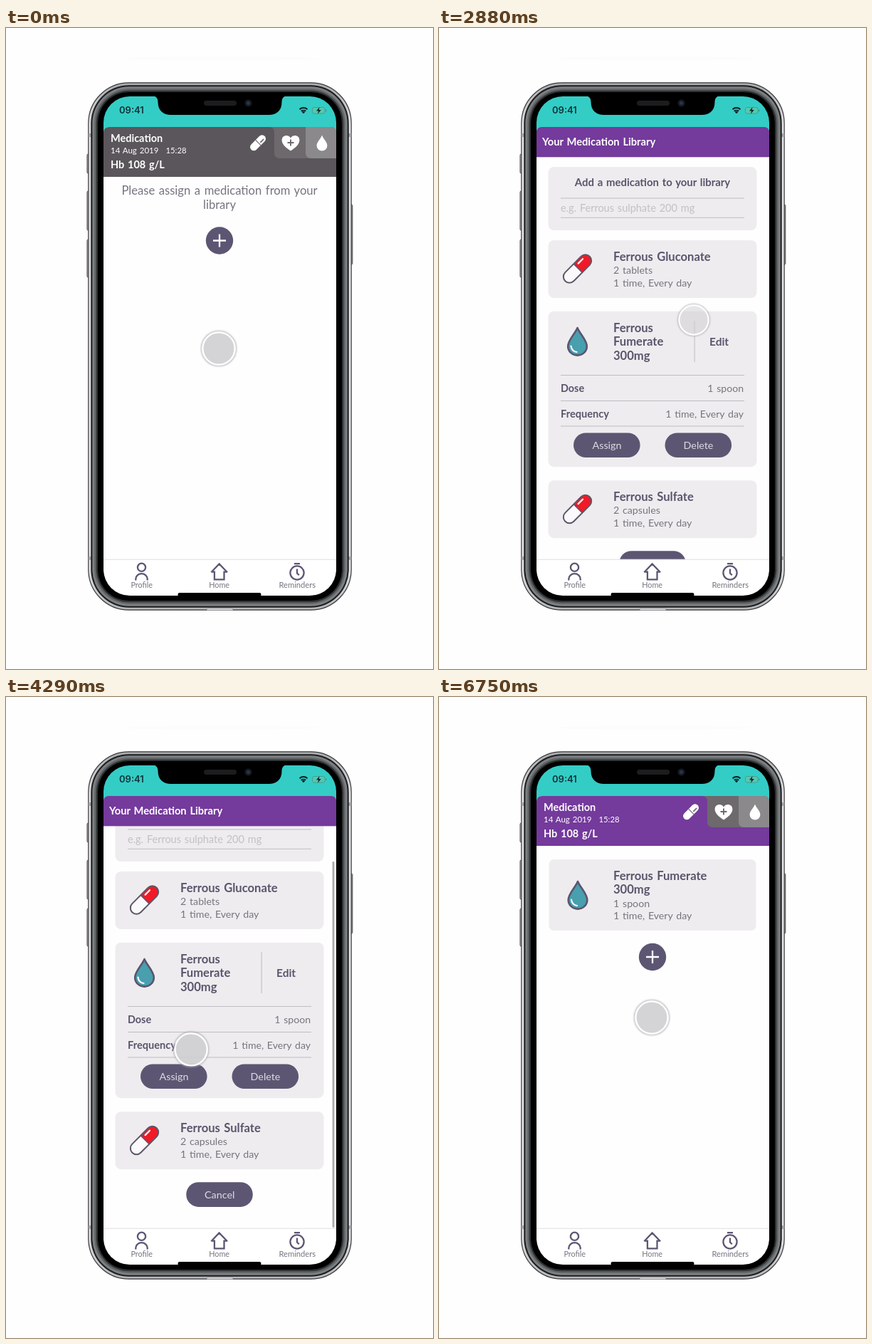
These frames come from a looping animation (600 px wide and 900 px high, 6780 ms). An HTML page:

```html
<!DOCTYPE html>
<html lang="en">
<head>
<meta charset="utf-8">
<title>Assign a medication</title>
<style>
  html, body { margin: 0; width: 100%; height: 100%; overflow: hidden; background: #fefefe; }
  svg { display: block; width: 600px; height: 900px; font-family: Lato, "Open Sans", sans-serif; }
  text { fill: #77737f; word-spacing: .08em; white-space: pre; }
  .b { font-weight: 700; fill: #5a546c; }
  .w { fill: #fff; }
  .mid { text-anchor: middle; }
  .end { text-anchor: end; }
  .line { fill: none; stroke: #5d5673; stroke-width: 2.3; }
</style>
</head>
<body>
<svg id="stage" viewBox="0 0 600 900" xmlns="http://www.w3.org/2000/svg"></svg>
<script>
const LOOP = 6780, LEFT = 137, WIDTH = 327, MAX_SCROLL = 53, GROWTH = 118.5;
const PURPLE = '#743a9c', GRAY = '#5a565b', INK = '#5d5673', CARD = '#efecef', TEAL = '#33cdc6', PAPER = '#fefefe';

// Drawing helpers
const rect = (x, y, w, h, r, fill, more = '') =>
  `<rect x="${x}" y="${y}" width="${w}" height="${h}" rx="${r}" fill="${fill}" ${more}/>`;
const text = (x, y, size, str, cls = '') =>
  `<text x="${x}" y="${y}" font-size="${size}" class="${cls}">${str}</text>`;
const path = (d, more) => `<path d="${d}" ${more}/>`;
const group = (id, inner, more = '') => `<g id="${id}" ${more}>${inner}</g>`;
const rule = y => rect(171, y - .5, 258, 1, 0, '#c0bdc3');
const card = (y, h) => rect(153.5, y, 293, h, 8, CARD);
const button = (x, y, label, id = '') =>
  rect(x, y, 93.6, 34.6, 17.3, INK, id && `id="${id}"`) +
  `<text x="${x + 47}" y="${y + 22.2}" font-size="14.3" class="mid" style="fill:#dedbe3">${label}</text>`;
const plus = y => `<circle cx="300" cy="${y}" r="19.2" fill="${INK}"/>` +
  path(`M291 ${y}h18M300 ${y - 9}v18`, 'stroke="#fff" stroke-width="2.3"');

const capsule = (x, y) => `<g transform="translate(${x} ${y}) rotate(-45)">` +
  rect(-24.5, -8.5, 49, 17, 8.5, '#fbf9fb') +
  path('M1 -8.5H16a8.5 8.5 0 0 1 0 17H1z', 'fill="#f01a28"') +
  rect(-24.3, -8.5, 48.6, 17, 8.5, 'none', 'stroke="#5b5768" stroke-width="2"') +
  path('M1 -8.5V8.5', 'stroke="#5b5768" stroke-width="1.6"') +
  path('M6 -4.4H15', 'stroke="#fff" stroke-width="2.2" stroke-linecap="round"') + '</g>';

const drop = (x, y) => `<g transform="translate(${x} ${y})">` +
  path('M0 -19C3 -11 13.3 -2 13.3 7A13.3 12.6 0 0 1 -13.3 7C-13.3 -2 -3 -11 0 -19Z',
    'fill="#489fae" stroke="#5a5570" stroke-width="2.6" stroke-linejoin="round"') +
  path('M-9 6.5A9 9 0 0 0 -1 15', 'fill="none" stroke="#fff" stroke-width="2.2" stroke-linecap="round"') + '</g>';

const entry = (y, icon, lines) => {
  const bold = lines.slice(0, -2), rest = lines.slice(-2);
  const next = y + 19.6 * (bold.length - 1);
  return icon +
    bold.map((s, i) => text(245, y + 19.6 * i, 16.6, s, 'b')).join('') +
    rest.map((s, i) => text(245, next + 18.4 + 17.6 * i, 14.2, s)).join('');
};
const FUMERATE = ['Ferrous Fumerate', '300mg', '1 spoon', '1 time, Every day'];

// Phone body
function phone() {
  const ring = (d, fill, more) =>
    rect(115.8 + d, 76.8 + d, 369.4 - 2 * d, 740.4 - 2 * d, 57 - d, fill, more);
  const key = (x, y, h) => rect(x, y, 4, h, 1.5, '#c9c9cc', 'stroke="#3c3c3f" stroke-width="1"');
  const band = (x, y) => rect(x, y, 5, 5, 0, '#a7a7aa');
  return `<ellipse cx="303" cy="43" rx="138" ry="3" fill="#fcfcfc"/>` +
    key(114, 177, 27) + key(114, 229, 55) + key(114, 297, 53) + key(482.8, 248, 84) +
    ring(0, 'url(#metal)', 'stroke="#3b3b3e" stroke-width="1.2"') +
    [148, 742].map(y => band(115.8, y) + band(480.2, y)).join('') +
    ring(3.5, '#1c1d1e') + ring(5.5, '#7d8082') + ring(8.5, '#606365') +
    ring(11, '#303233') + ring(13.2, '#000') +
    rect(282, 815, 37, 2.4, 1, '#e3e3e5', 'stroke="#77777a" stroke-width=".6"');
}

function statusBar() {
  return rect(LEFT, 96, WIDTH, 60, 0, TEAL) +
    `<text x="159" y="120.3" font-size="13" font-weight="600" style="font-family:Inter,sans-serif;fill:#123238">09:41</text>` +
    path('M412.5 114.2A8 8 0 0 1 423.5 114.2M414.8 116.8A4.8 4.8 0 0 1 421.2 116.8',
      'fill="none" stroke="#0c1f22" stroke-width="1.9"') +
    path('M418 120.3l-2.2 -2.3a3 3 0 0 1 4.4 0z', 'fill="#0c1f22"') +
    rect(430.5, 111.5, 17.5, 8.6, 2.4, '#55c9ab', 'stroke="#429d9a" stroke-width="1"') +
    rect(449, 114, 1.4, 3.6, .7, '#429d9a') +
    path('M440.5 111l-4.5 5.4h3l-1 4.4 4.8 -5.8h-3z', 'fill="#10282c"');
}

function notch() {
  return path('M204 95C210 95 213.5 98 213.5 104C213.5 116 221 122 232 122H369C380 122 387.5 116 387.5 104C387.5 98 391 95 397 95Z',
    'fill="#000"') + rect(278, 102, 46, 7, 3.5, '#1d1d1f') +
    `<circle cx="340.5" cy="105.5" r="5" fill="#161b22"/><circle cx="340.5" cy="105.5" r="2.4" fill="#28374a"/>`;
}

function recordHeader(color) {
  return rect(LEFT, 139, WIDTH, 70, 0, color, `id="head"`) +
    path('M372 139H464V183H385Q377 183 377 175V147Q377 139 369 139Z', 'fill="#6d696d"') +
    path('M421 139H464V183H429Q421 183 421 175Z', 'fill="#8b898b"') +
    text(147, 160, 14.5, 'Medication', 'b w') +
    text(147, 175.8, 11.5, '14 Aug 2019', 'w') + text(224.5, 175.8, 11.3, '15:28', 'w') +
    text(147, 196.5, 14.5, 'Hb 108 g/L', 'b w') +
    `<g transform="translate(354 161.3) rotate(-45)">` +
      rect(-13.4, -5.2, 26.8, 10.4, 5.2, '#fff') +
      path('M.5 -5.2V5.2', 'stroke="#77717a" stroke-width="1.2"') +
      path('M3.5 2H9', 'stroke="#77717a" stroke-width="1.8" stroke-linecap="round"') + '</g>' +
    path('M400 172.5C393 168 387.6 163 387.6 157.5C387.6 150 397 149 400 154.5C403 149 412.4 150 412.4 157.5C412.4 163 407 168 400 172.5Z', 'fill="#fff"') +
    path('M395.5 161h9M400 156.5v9', 'stroke="#6d696d" stroke-width="1.9"') +
    path('M444 150.5C446 156 451.4 160 451.4 165.3A7.4 7.2 0 0 1 436.6 165.3C436.6 160 442 156 444 150.5Z', 'fill="#fff"');
}

function record() {
  const empty = text(300, 234, 16.6, 'Please assign a medication from your', 'mid') +
    text(300, 253.6, 16.6, 'library', 'mid') + plus(298.5);
  const assigned = rect(154.5, 228, 291, 100, 7, CARD) + entry(256.5, drop(195, 278), FUMERATE) + plus(365);
  return rect(LEFT, 209, WIDTH, 540, 0, PAPER) +
    group('under', group('empty', empty) + group('assigned', assigned)) +
    rect(LEFT, 209, WIDTH, 540, 0, '#000', 'id="dim"') + recordHeader(GRAY);
}

function library() {
  const open = ['Ferrous', 'Fumerate', '300mg'].map((s, i) => text(245, 426.5 + 19.6 * i, 16.6, s, 'b')).join('') +
    drop(194.5, 440) + rect(358.5, 411, 1.2, 58, 0, '#c6c3c8') +
    text(380, 446, 15.5, 'Edit', 'b') + [487.5, 523.5, 559].map(rule).join('') +
    text(171, 511, 14.4, 'Dose', 'b') + text(428, 511, 14.1, '1 spoon', 'end') +
    text(171, 546.5, 14.6, 'Frequency', 'b') + text(428, 546.5, 14.1, '1 time, Every day', 'end') +
    button(189, 568.4, 'Assign', 'assign') + button(317.5, 568.4, 'Delete');
  const list = card(195, 89) + text(300, 221.5, 14.9, 'Add a medication to your library', 'b mid') +
    rule(239) + rule(266.3) +
    `<text x="171" y="258.3" font-size="14.5" style="fill:#c3c0c6">e.g. Ferrous sulphate 200 mg</text>` +
    card(298, 81) + entry(326.5, capsule(194.5, 338), ['Ferrous Gluconate', '2 tablets', '1 time, Every day']) +
    group('closed', card(397.7, 100) + entry(426.5, drop(194.5, 448), FUMERATE)) +
    group('open', card(397.7, 218.5) + open) +
    group('below', card(516.7, 81) +
      entry(545.3, capsule(194.5, 557), ['Ferrous Sulfate', '2 capsules', '1 time, Every day']) +
      button(253.2, 615.8, 'Cancel'));
  return rect(LEFT, 181, WIDTH, 568, 0, PAPER) +
    group('list', list) + rect(LEFT, 139, WIDTH, 42.3, 0, PURPLE) +
    text(145, 165.3, 14.7, 'Your Medication Library', 'b w') +
    rect(458.6, 182, 2.8, 514, 1.4, '#a5a3a7', 'id="bar"');
}

function navBar() {
  const icon = d => path(d, 'class="line"');
  return rect(LEFT, 746, WIDTH, 52, 0, '#fff') + rect(LEFT, 745.7, WIDTH, 1, 0, '#dedcdf') +
    '<circle cx="190.5" cy="757.3" r="5.6" class="line"/>' +
    icon('M182.3 775.4V773.5A8.2 7.3 0 0 1 198.7 773.5V775.4') +
    icon('M288.3 764.2L299.6 752.4L311 764.2M288.3 763.6H292.9V774.4H306.5V763.6H311') +
    '<circle cx="409" cy="765" r="9.6" class="line"/>' + icon('M405 752.2H413M409 759.5V765.5L411.8 768.3') +
    text(190.7, 786, 10.8, 'Profile', 'mid') + text(299.6, 786, 10.8, 'Home', 'mid') +
    text(409.3, 786, 11.2, 'Reminders', 'mid') + rect(241.5, 793, 117, 4.8, 2.4, '#000');
}

document.getElementById('stage').innerHTML = `<defs>
    <linearGradient id="metal" x1="0" y1="0" x2="0" y2="1">
      <stop offset="0" stop-color="#a9aaac"/><stop offset=".08" stop-color="#e2e2e4"/>
      <stop offset=".92" stop-color="#e2e2e4"/><stop offset="1" stop-color="#b4b5b7"/>
    </linearGradient>
    <filter id="soft" x="-30%" y="-30%" width="160%" height="160%"><feGaussianBlur stdDeviation="1.3"/></filter>
    <clipPath id="glass"><rect x="137" y="96" width="327" height="701" rx="37"/></clipPath>
    <clipPath id="pages"><path d="M137 760V147Q137 139 145 139H456Q464 139 464 147V760Z"/></clipPath>
  </defs>` + rect(0, 0, 600, 900, 0, PAPER) + phone() +
  `<g clip-path="url(#glass)">` + statusBar() +
  `<g clip-path="url(#pages)">` + rect(LEFT, 139, WIDTH, 610, 0, PAPER) + record() + group('library', library()) + '</g>' +
  navBar() + '</g>' + notch() +
  group('cursor', `<circle r="24.2" fill="none" stroke="#aaa7ad" stroke-width="1.6" filter="url(#soft)"/>
    <circle id="disc" r="22.5" fill="#cfcdd1"/><circle r="22.6" fill="none" stroke="#fff" stroke-width="2.4"/>`);

// Motion tables: time followed by values
const CURSOR = [[90, 299, 450], [720, 299, 299], [1000, 299, 299], [1500, 342, 442], [2050, 342, 442],
  [2700, 358, 410], [2890, 358, 410], [3680, 358, 343], [3950, 358, 343], [4450, 231, 540],
  [5350, 231, 540], [6200, 299, 450]];
const PRESS = [[740, 0], [800, 1], [880, 1], [960, 0], [1680, 0], [1750, 1], [1850, 1], [1920, 0],
  [2790, 0], [2860, 1], [3700, 1], [3770, 0], [4490, 0], [4560, 1], [4660, 1], [4730, 0]];
const BAR = [[2900, 0], [2990, 1], [4250, 1], [4500, 0]];

const clamp = v => Math.max(0, Math.min(1, v));
const smooth = v => (1 - Math.cos(Math.PI * v)) / 2;
const easeOut = v => 1 - (1 - v) ** 3;
const span = (t, from, length) => clamp((t - from) / length);

function sample(table, t) {
  const i = table.findIndex(row => row[0] > t);
  if (i === 0) return table[0].slice(1);
  if (i < 0) return table[table.length - 1].slice(1);
  const a = table[i - 1], b = table[i], k = smooth((t - a[0]) / (b[0] - a[0]));
  return a.slice(1).map((v, j) => v + (b[j + 1] - v) * k);
}

const el = {};
document.querySelectorAll('svg [id]').forEach(n => el[n.id] = n);
const set = (id, name, value) => el[id].setAttribute(name, value);
const show = (id, on) => set(id, 'visibility', on ? 'inherit' : 'hidden');
const move = (id, x, y) => set(id, 'transform', `translate(${x} ${y})`);

function scrollAt(t, y) {
  const pull = t < 2890 ? 0 : t < 3700 ? 410 - y : 67;
  const over = Math.max(0, pull - MAX_SCROLL) * .4 * (1 - smooth(span(t, 3775, 320)));
  return Math.min(pull, MAX_SCROLL) + over;
}

function draw(t) {
  const [x, y] = sample(CURSOR, t), [press] = sample(PRESS, t);
  set('cursor', 'transform', `translate(${x} ${y}) scale(${1 - .09 * press})`);
  set('disc', 'fill-opacity', .88 - .38 * press);

  const back = t >= 4600;
  const off = back ? easeOut(span(t, 4764, 500)) : 1 - easeOut(span(t, 900, 450));
  move('library', WIDTH * off, 0);
  show('library', off < 1);
  move('under', -87 * (1 - off), 0);
  set('dim', 'opacity', .2 * (1 - off));
  set('head', 'fill', back ? PURPLE : GRAY);
  show('assigned', back);
  show('empty', !back);

  const open = t >= 1890;
  show('open', open);
  show('closed', !open);
  move('below', 0, open ? GROWTH : 0);
  set('assign', 'fill', t >= 4540 ? '#85798f' : INK);

  const scroll = scrollAt(t, y), over = Math.max(0, scroll - MAX_SCROLL), length = 514 - over * 1.25;
  move('list', 0, -scroll);
  set('bar', 'height', length);
  set('bar', 'y', over ? 745 - length : 182 + scroll * 49 / MAX_SCROLL);
  set('bar', 'opacity', sample(BAR, t)[0]);
}

function tick() {
  draw(performance.now() % LOOP);
  requestAnimationFrame(tick);
}
draw(0);
tick();
</script>
</body>
</html>
```
